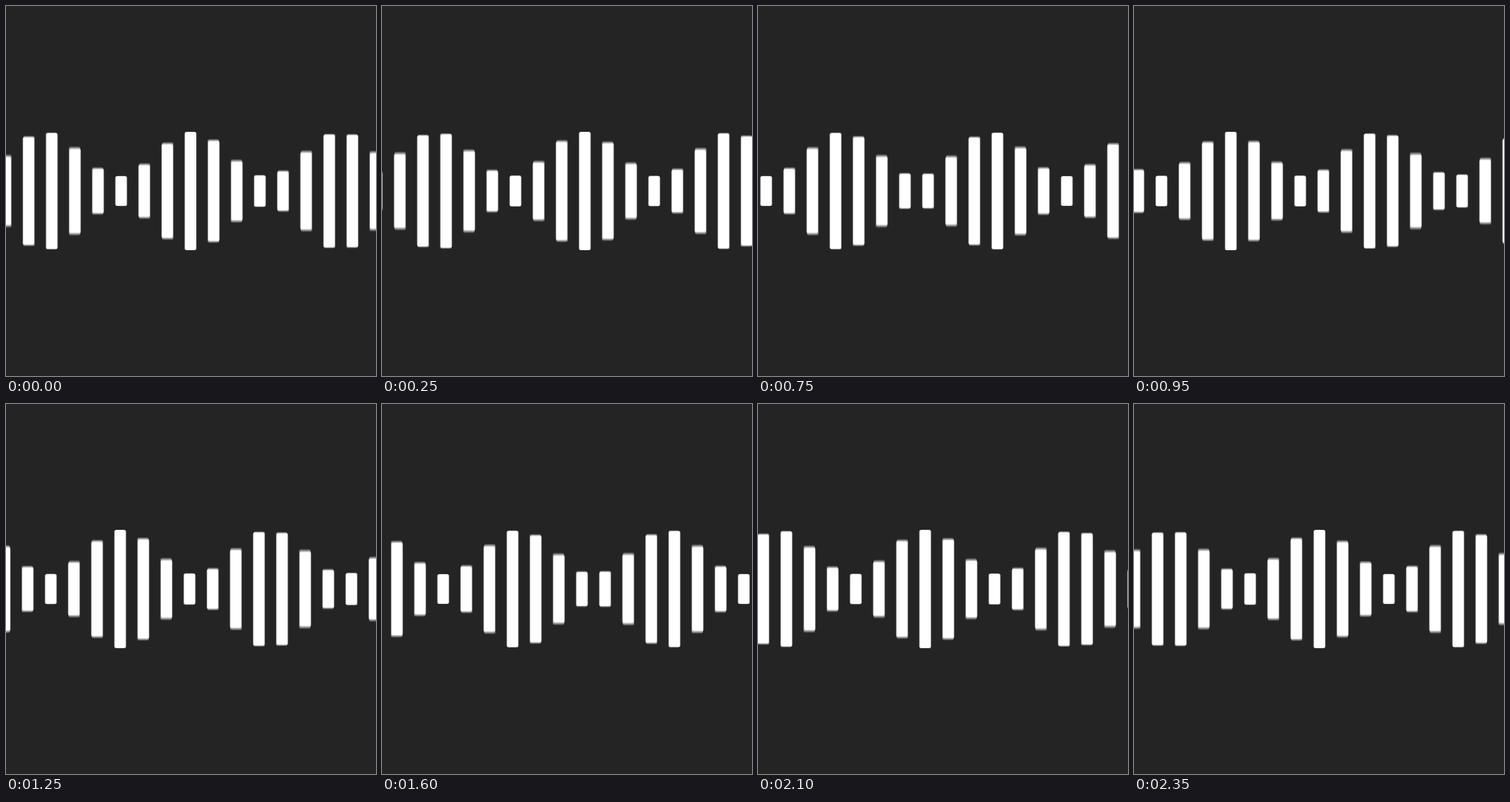
Recreate the animation shown at these times as an HTML page without scripts. Size 500 by 500 pixels, loop 2.4 s.

```html
<!DOCTYPE html>
<html lang="en">
<head>
<meta charset="utf-8">
<title>Sound wave</title>
<style>
  @property --tick { syntax: "<number>"; inherits: true; initial-value: 0; }

  html, body { margin: 0; width: 100%; height: 100%; overflow: hidden; background: #242424; }

  svg {
    display: block;
    width: 500px;
    height: 500px;
    animation: tick 2400ms steps(48) -1ms infinite;
  }
  @keyframes tick { from { --tick: 0; } to { --tick: 48; } }

  .back { fill: #242424; }

  /* Bars drift left two pitches per loop while a 200px wave runs right. */
  .bar {
    --time: calc(var(--tick) + 0.5 + var(--shift));
    --height: calc(100px + 60px * cos(56.25deg * var(--k) - 9.84375deg * var(--time)));
    x: calc(242.2px + 31.25px * var(--k) - 62.5px * var(--time) / 48);
    y: calc(250px - var(--height) / 2);
    width: 15.6px;
    height: var(--height);
    rx: 2.5px;
    ry: 2.5px;
    fill: #fff;
  }

  /* Motion blur: layers within one tick, averaged by opacity 1/n. */
  .layer { opacity: calc(1 / var(--n)); }
</style>
</head>
<body>
<svg viewBox="0 0 500 500">
  <defs>
    <g id="bars">
      <rect class="back" width="500" height="500"/>
      <rect class="bar" style="--k:-8"/>
      <rect class="bar" style="--k:-7"/>
      <rect class="bar" style="--k:-6"/>
      <rect class="bar" style="--k:-5"/>
      <rect class="bar" style="--k:-4"/>
      <rect class="bar" style="--k:-3"/>
      <rect class="bar" style="--k:-2"/>
      <rect class="bar" style="--k:-1"/>
      <rect class="bar" style="--k:0"/>
      <rect class="bar" style="--k:1"/>
      <rect class="bar" style="--k:2"/>
      <rect class="bar" style="--k:3"/>
      <rect class="bar" style="--k:4"/>
      <rect class="bar" style="--k:5"/>
      <rect class="bar" style="--k:6"/>
      <rect class="bar" style="--k:7"/>
      <rect class="bar" style="--k:8"/>
      <rect class="bar" style="--k:9"/>
      <rect class="bar" style="--k:10"/>
    </g>
  </defs>
  <use class="layer" href="#bars" style="--n:1; --shift:-0.4"/>
  <use class="layer" href="#bars" style="--n:2; --shift:-0.2"/>
  <use class="layer" href="#bars" style="--n:3; --shift:0"/>
  <use class="layer" href="#bars" style="--n:4; --shift:0.2"/>
  <use class="layer" href="#bars" style="--n:5; --shift:0.4"/>
</svg>
</body>
</html>
```
